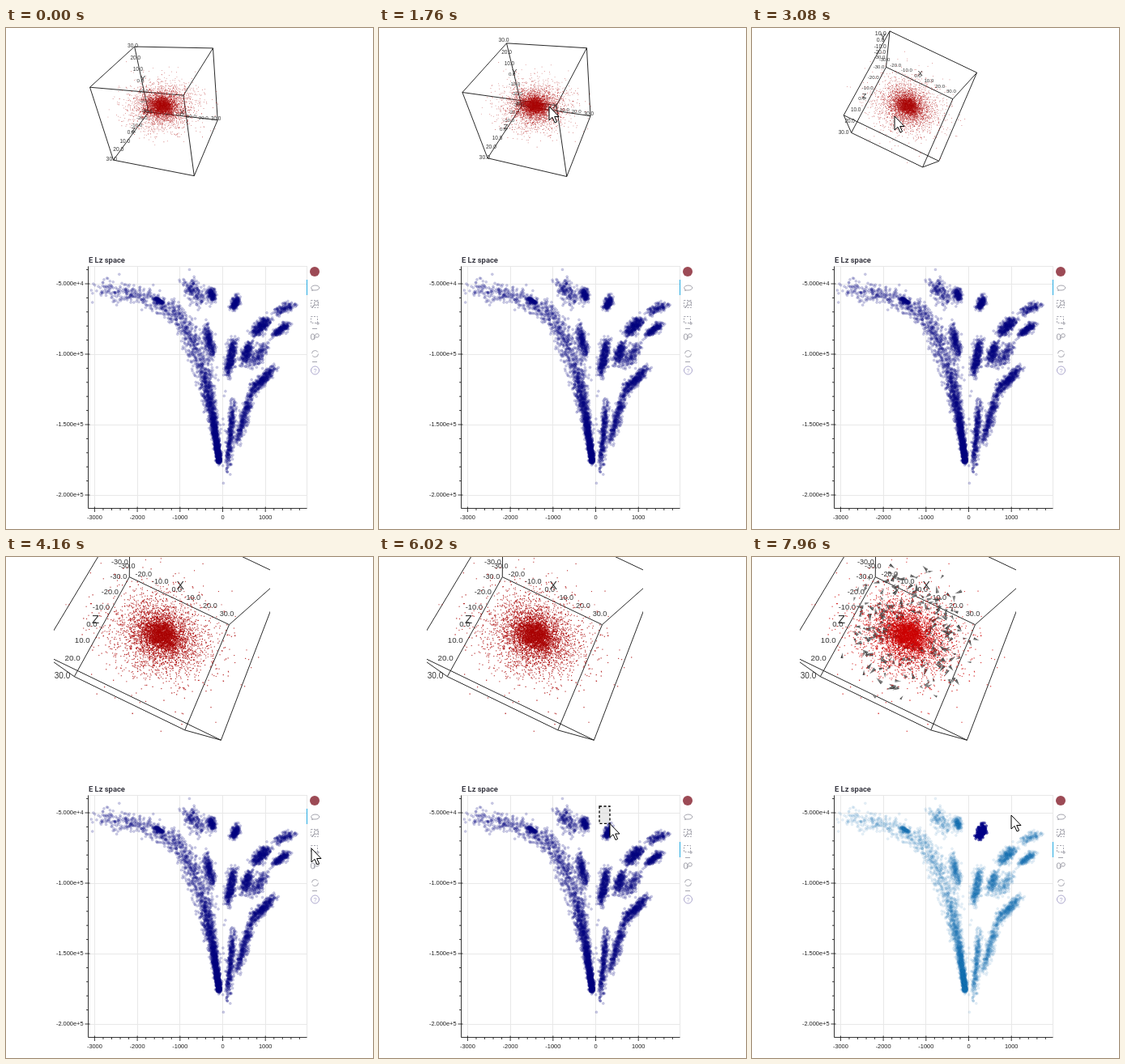
These frames come from a looping animation (453 by 619 pixels, 8000 ms). An HTML page with a canvas:

```html
<!DOCTYPE html>
<html lang="en">
<head>
<meta charset="utf-8">
<title>E Lz space</title>
<style>
  html, body { margin: 0; width: 100%; height: 100%; overflow: hidden; background: #fff; }
  canvas, svg { position: absolute; left: 0; top: 0; width: 453px; height: 619px; }
  text { font: 7.4px "Liberation Sans", Arial, sans-serif; fill: #222; }
  .title { font: bold 9.4px Roboto, "Liberation Sans", sans-serif; fill: #3a3a44; }
  .icons { fill: none; stroke: #a5a5ae; stroke-width: 1; }
</style>
</head>
<body>
<canvas id="view" width="453" height="619"></canvas>
<svg viewBox="0 0 453 619">
  <g id="axes"></g>
  <text class="title" x="102" y="290">E Lz space</text>
  <g class="icons">
    <circle cx="381" cy="301" r="6" fill="#9c4a55" stroke="none"/>
    <path d="M378 325q1-2-1-3a5 3 0 1 1 4 2h-4"/>
    <path d="M376.500 336.500h9v9h-9z" stroke-dasharray="2 1.500"/>
    <circle cx="383" cy="340" r="2.500" fill="#fff"/><path d="M381 342l-3 3" stroke-width="1.500"/>
    <path d="M376.500 356.500h8v8h-8z" stroke-dasharray="2 1.500"/>
    <path d="M383 365h4M385 363v4M378 371.500h6M378 412.500h6"/>
    <rect x="376.500" y="378" width="4" height="7" rx="2"/>
    <circle cx="384" cy="380" r="2.300"/><path d="M382 382l-2 3"/>
    <circle cx="381.500" cy="402.500" r="4" stroke-dasharray="10 2.500"/>
    <circle cx="381.500" cy="423" r="5" stroke="#aaa6cc"/>
    <text x="381.500" y="426" text-anchor="middle" stroke="none" style="fill:#aaa6cc">?</text>
  </g>
  <path id="bar" d="M371.500 311v19" stroke="#26aae1"/>
  <rect id="box" x="272" y="308" fill="#d3d3d3" fill-opacity=".5" stroke="#000" stroke-width="1.300" stroke-dasharray="3 2.500"/>
  <path id="cursor" d="M0 0V17L4 13.400L7 20L9.600 18.900L6.700 12.500H12Z" fill="#fff" stroke="#000"/>
</svg>
<script>
const $ = id => document.getElementById(id);
const ctx = $('view').getContext('2d');
const DURATION = 8000, STEP = 77;
const PICK = { armed: 5260, drag: 5980, recolor: 6950, cones: 7020 };

// Each move: start, end, then the state it arrives at
const cursorMoves = [
  [110, 340, 404, 487], [570, 890, 258, 209], [1040, 1270, 194, 47],
  [1440, 1760, 210, 97], [1840, 2220, 198, 144], [2290, 2670, 241, 186],
  [2840, 3080, 176, 109], [3630, 3780, 439, 460], [4010, 4160, 377, 360],
  [4620, 4700, 385, 364], [5260, 6020, 275, 326], [6090, 6550, 299, 365],
  [7570, 7960, 320, 319]];
const turns = [ // pitch, yaw, roll
  [1440, 1760, .675, -.52, .2], [1840, 2220, .95, -1.04, .6], [2290, 2370, 1.294, -.05, -.4]];

function progress(t, from, to) {
  if (t < from) return 0;
  const steps = Math.round((to - from) / STEP) + 1;
  return Math.min(1, (1 + Math.floor((t - from) / STEP + .1)) / steps);
}

const travel = (start, moves, t) => moves.reduce((state, [from, to, ...goal]) => {
  const p = progress(t, from, to);
  return state.map((v, i) => v + (goal[i] - v) * p);
}, start);

let seed = 7;
function rand() {
  seed = (seed + 0x6D2B79F5) | 0;
  let r = Math.imul(seed ^ (seed >>> 15), 1 | seed);
  r = (r + Math.imul(r ^ (r >>> 7), 61 | r)) ^ r;
  return ((r ^ (r >>> 14)) >>> 0) / 4294967296;
}
const gauss = () => Math.sqrt(-2 * Math.log(1 - rand())) * Math.cos(2 * Math.PI * rand());
const times = (n, make) => Array.from({ length: n }, make);
const jitter = (x, y, w) => [x + gauss() * w, y + gauss() * w];

// Left arm: energy saturates exponentially with distance from the axis
const arm = (n, near, far, spread) => times(n, () => {
  const dx = near * (far / near) ** (rand() ** 1.8);
  const y = 580 - 245 * (1 - Math.exp(-dx / 25)) - .08 * dx;
  return jitter(268 - dx, y, Math.min(6, dx * spread));
});

// Plume with soft ends: x0, y0, x1, y1, width, count
const plume = ([x0, y0, x1, y1, w, n]) => times(n, () => {
  const t = rand() * .7 + rand() * .3;
  return jitter(x0 + (x1 - x0) * t, y0 + (y1 - y0) * t, w);
});
const plumes = [
  [183, 334, 194, 340, 1.2, 150], [219, 312, 246, 340, 5, 200], [252, 322, 256, 336, 2.2, 230],
  [246, 366, 256, 408, 2.8, 320], [282, 382, 273, 432, 2.8, 460], [302, 387, 293, 416, 3.4, 300],
  [322, 390, 304, 418, 3.6, 170], [326, 358, 304, 379, 3.3, 400], [350, 364, 329, 381, 2.2, 260],
  [356, 341, 332, 352, 2.8, 150], [331, 418, 300, 454, 3, 440], [304, 446, 284, 516, 2.6, 400],
  [281, 456, 273, 550, 2, 440]];

const others = [
  ...arm(2500, 5, 155, .25), ...arm(800, 6, 24, .14), ...plumes.flatMap(plume),
  ...times(10, () => jitter(270, 350 + rand() * 230, 1.5))];
const picked = plume([286, 332, 280, 348, 2.3, 260]);

function scatterLayer(layers) {
  const layer = document.createElement('canvas');
  layer.width = 453; layer.height = 619;
  const c = layer.getContext('2d');
  c.lineWidth = .6;
  for (const [dots, color] of layers) {
    c.fillStyle = c.strokeStyle = color;
    for (const [x, y] of dots) {
      c.beginPath();
      c.arc(x, y, 1.5, 0, 7);
      c.fill();
      c.stroke();
    }
  }
  return layer;
}
const plainScatter = scatterLayer([[[...others, ...picked], 'rgba(0,0,128,.2)']]);
const pickedScatter = scatterLayer([[others, 'rgba(31,119,180,.11)'], [picked, 'rgba(0,0,135,.6)']]);

// Stars and velocity cones in cube units
const cloud = (n, s) => times(n, () => [gauss() * s, gauss() * s * .65, gauss() * s * .8]);
const stars = [...cloud(1000, .46), ...cloud(2300, .3), ...cloud(2200, .14)];
const cones = times(240, () => {
  const d = [gauss(), gauss(), gauss()], r = (.18 + .8 * Math.sqrt(rand())) / Math.hypot(...d);
  return { at: d.map(v => v * r), angle: rand() * 2 * Math.PI, size: 5 + rand() * 5, shade: 70 + rand() * 45 };
});

function rotate(u, v, angle) {
  const c = Math.cos(angle), s = Math.sin(angle);
  return [u * c - v * s, u * s + v * c];
}

function camera(t) {
  const [pitch, yaw, roll] = travel([.57, -.495, .18], turns, t);
  const zoom = 1 - (1 - progress(t, 3220, 3460)) ** 2;
  const distance = 7 - 2.73 * zoom;
  const project = ([x, y, z]) => {
    [z, x] = rotate(z, x, yaw);
    [y, z] = rotate(y, z, pitch);
    [x, y] = rotate(x, y, roll);
    const depth = distance - z, scale = 376 / depth;
    return [192.3 + x * scale, 96 - y * scale, depth];
  };
  return { project, tilt: (Math.sin(pitch) - .54) / .42 };
}

function drawCube(project) {
  const bits = [1, 2, 4], corner = i => project(bits.map(bit => i & bit ? 1 : -1));
  ctx.strokeStyle = '#111';
  ctx.lineWidth = .9;
  ctx.beginPath();
  for (let i = 0; i < 8; i++) for (const bit of bits) {
    if (i & bit) continue;
    ctx.moveTo(...corner(i).slice(0, 2));
    ctx.lineTo(...corner(i | bit).slice(0, 2));
  }
  ctx.stroke();
}

// How far the labels of each axis move aside as the cube tilts
const lean = { X: [0, -8], Y: [-6, -11], Z: [-7, 1] };

function drawLabels({ project, tilt }) {
  ctx.textAlign = 'center';
  ctx.textBaseline = 'middle';
  ctx.fillStyle = '#333';
  Object.entries(lean).forEach(([name, [lx, ly]], axis) => {
    const put = (text, value, size, nudge) => {
      const p = [-1, -1, -1];
      p[axis] = value / 30;
      const [x, y, depth] = project(p), k = 8.2 / depth;
      ctx.font = `${size / depth}px "Liberation Sans", Arial, sans-serif`;
      ctx.fillText(text, x + (lx * tilt - 2 + nudge) * k, y + (ly * tilt - 1 - nudge) * k);
    };
    for (let v = -30; v <= 30; v += 10) put(v.toFixed(1), v, 50, 0);
    put(name, 0, 78, 3);
  });
}

function drawStars(project, color) {
  ctx.fillStyle = color;
  for (const star of stars) {
    const [x, y, depth] = project(star), s = 4.8 / depth;
    ctx.fillRect(x - s / 2, y - s / 2, s, s);
  }
}

function drawCones(project) {
  for (const { at, angle, size, shade } of cones) {
    const [x, y] = project(at);
    ctx.save();
    ctx.translate(x, y);
    ctx.rotate(angle);
    for (const side of [-1, 1]) {
      const g = shade + side * 18;
      ctx.fillStyle = `rgb(${g},${g},${g})`;
      ctx.beginPath();
      ctx.moveTo(size / 2, 0);
      ctx.lineTo(-size / 2, side * size * .23);
      ctx.lineTo(-size / 2, 0);
      ctx.fill();
    }
    ctx.restore();
  }
}

function drawScene(t) {
  const cam = camera(t), showCones = t >= PICK.cones;
  ctx.save();
  ctx.beginPath();
  ctx.rect(59, 0, 267, 230);
  ctx.clip();
  drawCube(cam.project);
  drawLabels(cam);
  if (showCones) drawCones(cam.project);
  drawStars(cam.project, showCones ? 'rgba(205,0,0,.8)' : 'rgba(170,0,0,.8)');
  ctx.restore();
}

const tickX = v => 267.5 + v * .0527;
const tickY = v => 229 - v * .00174;

function drawGrid() {
  ctx.strokeStyle = '#e8e8e8';
  ctx.lineWidth = 1;
  ctx.strokeRect(101.5, 294.5, 270, 299);
  ctx.beginPath();
  for (let v = -3000; v <= 1000; v += 1000) {
    const x = Math.floor(tickX(v)) + .5;
    ctx.moveTo(x, 295); ctx.lineTo(x, 593);
  }
  for (let v = -2e5; v <= -5e4; v += 5e4) {
    const y = Math.floor(tickY(v)) + .5;
    ctx.moveTo(102, y); ctx.lineTo(371, y);
  }
  ctx.stroke();
}

function buildAxes() {
  let path = 'M101.500 294.500V593.500H371.500', labels = '';
  for (let v = -3000; v <= 1800; v += 200) {
    const major = v % 1000 === 0, x = tickX(v);
    path += `M${x} ${major ? 591.5 : 593}V${major ? 598 : 596}`;
    if (major) labels += `<text x="${x}" y="606.500" text-anchor="middle">${v}</text>`;
  }
  for (let v = -20e4; v <= -4e4; v += 1e4) {
    const major = v % 5e4 === 0, y = tickY(v);
    path += `M${major ? 97.5 : 99} ${y}H${major ? 103.5 : 102}`;
    if (major) labels += `<text x="95.500" y="${y + 2}" text-anchor="end">${v.toExponential(3)}</text>`;
  }
  $('axes').innerHTML = `<path d="${path}" fill="none" stroke="#222" stroke-width=".9"/>${labels}`;
}

function render(t) {
  const [x, y] = travel([358, 640], cursorMoves, t);
  const recolored = t >= PICK.recolor, dragging = t >= PICK.drag && !recolored;
  ctx.clearRect(0, 0, 453, 619);
  drawScene(t);
  drawGrid();
  ctx.drawImage(recolored ? pickedScatter : plainScatter, 0, 0);
  $('bar').setAttribute('transform', `translate(0 ${t >= PICK.armed ? 41 : 0})`);
  $('cursor').setAttribute('transform', `translate(${x} ${y})`);
  $('box').style.display = dragging ? '' : 'none';
  if (dragging) {
    $('box').setAttribute('width', Math.max(0, x - 272));
    $('box').setAttribute('height', Math.max(0, y - 308));
  }
}

buildAxes();
const start = performance.now();
function tick() {
  render((performance.now() - start) % DURATION);
  requestAnimationFrame(tick);
}
tick();
</script>
</body>
</html>
```
